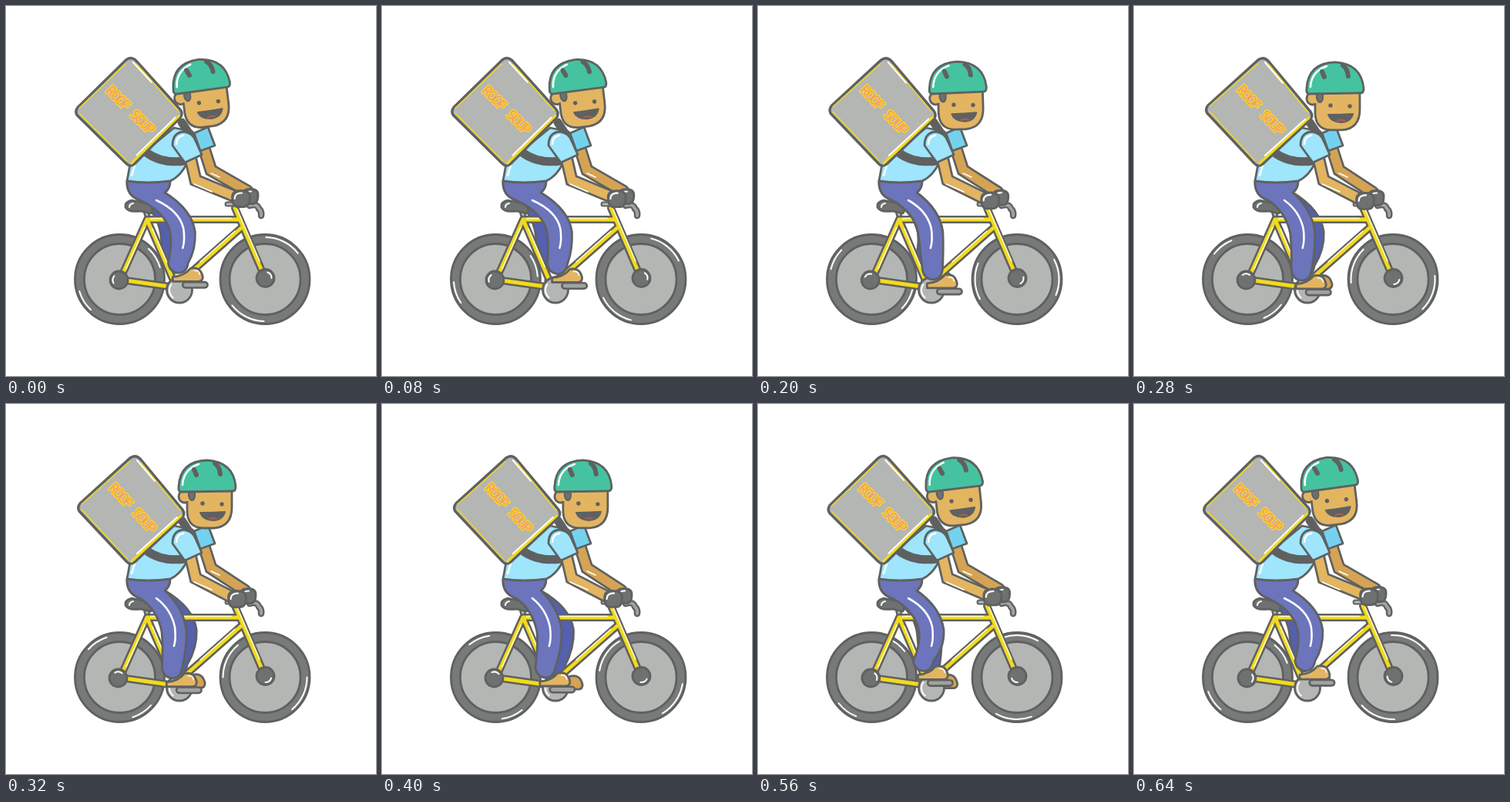
An HTML page with a canvas for the animation above (0.68 s loop, 480 by 480 pixels).

```html
<!DOCTYPE html>
<html lang="en">
<head>
<meta charset="utf-8">
<style>
  html, body { margin: 0; width: 100%; height: 100%; overflow: hidden; background: #fff; }
  canvas { display: block; }
</style>
</head>
<body>
<canvas id="stage" width="480" height="480"></canvas>
<script>
const ctx = document.getElementById('stage').getContext('2d');
const LOOP = 680, STEP = 40, TAU = Math.PI * 2, RAD = Math.PI / 180;
const INK = '#5f6161', DARK = '#6f7171', TIRE = '#787a7a', GREY = '#b4b6b4', STEEL = '#a0a2a1',
      YELLOW = '#f2da1b', SKIN = '#e3b561', SKIN_SHADE = '#d5a354', SHIRT = '#9fe5fc',
      SHIRT_SHADE = '#74d2ee', BLUE = '#6c74bb', BLUE_SHADE = '#5560ae', GREEN = '#45c3a0';

ctx.lineCap = 'round';

function stroke(d, color, width, join = 'round') {
  ctx.lineJoin = join;
  ctx.strokeStyle = color;
  ctx.lineWidth = width;
  ctx.stroke(new Path2D(d));
}

function shape(d, fill, width = 2.8) {
  ctx.fillStyle = fill;
  ctx.fill(new Path2D(d));
  stroke(d, INK, width);
}

function tube(d, color, width, edge = 2.6, join = 'round') {
  stroke(d, INK, width, join);
  stroke(d, color, width - edge * 2, join);
}

function disc(x, y, r, fill, edge = 2.8) {
  ctx.beginPath();
  ctx.arc(x, y, r, 0, TAU);
  ctx.fillStyle = fill;
  ctx.fill();
  if (edge) {
    ctx.strokeStyle = INK;
    ctx.lineWidth = edge;
    ctx.stroke();
  }
}

function shine(x, y, r, from, to) {
  ctx.beginPath();
  ctx.arc(x, y, r, from * RAD, to * RAD);
  ctx.strokeStyle = '#fff';
  ctx.lineWidth = 2;
  ctx.stroke();
}

function group(x, y, degrees, draw) {
  ctx.save();
  ctx.translate(x, y);
  ctx.rotate(degrees * RAD);
  ctx.translate(-x, -y);
  draw();
  ctx.restore();
}

function wheel(x, angle, length) {
  disc(x, 354.5, 58, TIRE);
  disc(x, 354.5, 46, GREY);
  for (const side of [0, 180]) {
    shine(x, 354.5, 54.5, angle + side - length / 2, angle + side + length / 2);
  }
}

function hub(x, y, angle) {
  disc(x, y, 11.5, DARK);
  shine(x, y, 8, angle, angle + 70);
}

function leg(knee, x, y, color) {
  shape(`M157 227Q156 246 174 252Q${knee - 20} 268 ${knee - 15} 295Q${knee - 13} 312 ${x - 13} ${y}
    Q${x - 11} ${y + 12} ${x} ${y + 13}Q${x + 11} ${y + 13} ${x + 13} ${y}
    Q${knee + 18} 316 ${knee + 17} 293Q${knee + 13} 264 206 242Q213 237 213 227Z`, color);
}

function foot(x, y, color) {
  shape(`M${x - 10} ${y + 12}V${y + 6}Q${x + 5} ${y + 5} ${x + 13} ${y - 5}Q${x + 26} ${y - 8} ${x + 29} ${y + 6}
    Q${x + 29} ${y + 12} ${x + 23} ${y + 12}Z`, color);
}

function frame() {
  tube('M183 277L148 355L212 364M183 277L220 363L305 288M302 277H183M297 262L336 353', YELLOW, 10);
  stroke('M180 287L156 341M188 275.5H292M300 264L329 331M297 292L252 332M190 289L211 338', '#fffbd0', 1.6);
}

function saddle() {
  tube('M181 264L184 275', GREY, 8);
  shape('M163 252Q154 254 155 261Q158 268 174 266L188 269Q192 265 187 257Z', DARK);
  stroke('M160 261Q160 257 165 256', '#fff', 2);
}

function torso() {
  shape('M244 165L262 157L271 181L252 188Z', SHIRT_SHADE);
  shape('M157 227L161 205L218 158L242 163L250 184L236 201Q228 220 213 227Q183 231 157 227Z', SHIRT);
  stroke('M182 190Q202 205 232 201', INK, 11);
  stroke('M228 151L240 169', INK, 11);
  stroke('M163 220L167 207', '#fff', 2.5);
}

function box() {
  shape('M161 70Q168 65 174 71L229 137Q233 143 228 148L167 205Q161 210 156 204L95 139Q92 134 96 129Z', GREY, 3.4);
  stroke('M175 76L226 138M98 130L160 75M98 137L157 201', YELLOW, 1.4);
  stroke('M163 204L227 145', YELLOW, 3.2);
  stroke('M170 73L193 100M170 194L222 147', '#fff', 2);
  ctx.save();
  ctx.translate(163, 135);
  ctx.rotate(47 * RAD);
  ctx.font = '18px "Noto Sans Mono", monospace';
  ctx.letterSpacing = '-2px';
  ctx.textAlign = 'center';
  ctx.textBaseline = 'middle';
  ctx.strokeStyle = '#fcd02c';
  ctx.lineWidth = 3.2;
  ctx.strokeText('ROOF SOUP', 0, 0);
  ctx.fillStyle = '#ee9a78';
  ctx.fillText('ROOF SOUP', 0, 0);
  ctx.restore();
}

function head() {
  disc(232, 120, 8, SKIN);
  shape('M235 111V140Q236 161 257 161H270Q293 159 293 134V111Z', SKIN);
  ctx.fillStyle = SKIN;
  ctx.fillRect(231, 113, 8, 13);
  shape('M237 112H245V120Q244 125 241 125Q238 124 237 119Z', DARK, 2);
  disc(255, 129, 2.7, INK, 0);
  disc(280, 130, 2.7, INK, 0);
  shape('M252 141Q268 141 284 140Q281 151 268 151Q255 150 252 141Z', INK, 2);
  stroke('M264 149Q268 147 273 149', '#a5604f', 2.4);
  shape('M227 114Q223 113 224 107Q226 74 261 73Q295 75 298 107Q298 113 294 113Z', GREEN);
  stroke('M229 105Q230 85 250 78', '#fff', 2.6);
  stroke('M244 85L247 92M271 77Q277 81 278 91', INK, 6);
}

function arm(d, color, glint) {
  tube(d, color, 17, 2.7, 'miter');
  stroke(glint, '#fff', 1.6);
}

function glove(x, y, w, h) {
  shape(`M${x - w} ${y - 2}Q${x - w} ${y - h} ${x} ${y - h}Q${x + w} ${y - h} ${x + w} ${y - 2}
    Q${x + w} ${y + h} ${x + 3} ${y + h}H${x - 4}Q${x - w} ${y + h} ${x - w} ${y - 2}Z`, DARK);
  stroke(`M${x - w + 3} ${y}Q${x - w + 3} ${y - h + 3} ${x + 1} ${y - h + 3}`, '#fff', 2.2);
}

function draw(now) {
  const phase = Math.floor(now % LOOP / STEP) * STEP / LOOP + 0.01;
  // The cycle slows down at both ends of the rider's sway.
  const cycle = phase * TAU - 0.35 * Math.sin(phase * 2 * TAU);
  const turn = cycle - 70 * RAD;
  const lean = (1 - Math.cos(cycle)) / 2;
  const cos = Math.cos(turn), sin = Math.sin(turn);
  const swing = Math.cos(turn - 325 * RAD);
  const roll = cycle / RAD / 2;
  const knee = 222.5 + 7 * swing;
  const ankle = { x: 222 + 12 * cos, y: 350 + 5 * sin };
  const farAnkle = { x: 227 - 7 * cos, y: 354 - 7 * cos };
  const hand = { x: 305 - 5 * lean, y: 250 + 3 * lean };
  const farHand = { x: 318 - 3 * lean, y: 246 + 2 * lean };

  ctx.fillStyle = '#fff';
  ctx.fillRect(0, 0, 480, 480);

  wheel(147.5, roll + 148, 30);
  wheel(336, roll - 64, 50);
  leg(223 - 9 * swing, farAnkle.x - 7, farAnkle.y - 18, BLUE_SHADE);
  foot(farAnkle.x, farAnkle.y, SKIN_SHADE);
  saddle();
  frame();
  hub(146.5 - lean, 355.5, roll + 150);
  hub(336.5, 353, roll - 70);
  disc(225, 368.5, 16.5, GREY);
  shine(225, 368.5, 13, 130, 215);

  const px = ankle.x + 19, py = ankle.y + 16.5;
  tube(`M${px - 12.5} ${py}H${px + 12.5}`, STEEL, 10);
  leg(knee, ankle.x - 3, ankle.y - 12, BLUE);
  foot(ankle.x, ankle.y, SKIN);
  stroke(`M${ankle.x + 18} ${ankle.y - 2}Q${ankle.x + 24} ${ankle.y - 3} ${ankle.x + 25} ${ankle.y + 3}`, '#fff', 1.5);
  stroke(`M195 252Q${knee - 3} 266 ${knee + 2} 289Q${knee + 4} 304 ${knee + 1} 314`, '#fff', 2.6);

  tube('M287 257H303', GREY, 7, 2);
  tube('M316 259Q326 256 328 263Q332 266 331 272', STEEL, 8.5, 2.3);
  arm(`M257 185L266 213L${farHand.x - 5} ${farHand.y - 6}`, SKIN_SHADE, 'M266 217L277 222');
  glove(farHand.x - 1, farHand.y + 1, 10, 9.5);
  torso();
  arm(`M239 196L246 226L${hand.x - 8} ${hand.y - 3}`, SKIN, 'M244 231L267 241');
  glove(hand.x, hand.y, 11.5, 10.5);
  shape('M216 181Q216 164 231 163Q243 165 246 175L254 193L232 203Z', SHIRT);
  stroke('M221 179Q221 169 230 168', '#fff', 2.5);
  group(161, 208, -2.3 * (1 - lean), box);
  group(226, 165, -7 * (1 - lean), head);
}

function tick() {
  draw(performance.now());
  requestAnimationFrame(tick);
}
tick();
</script>
</body>
</html>
```
